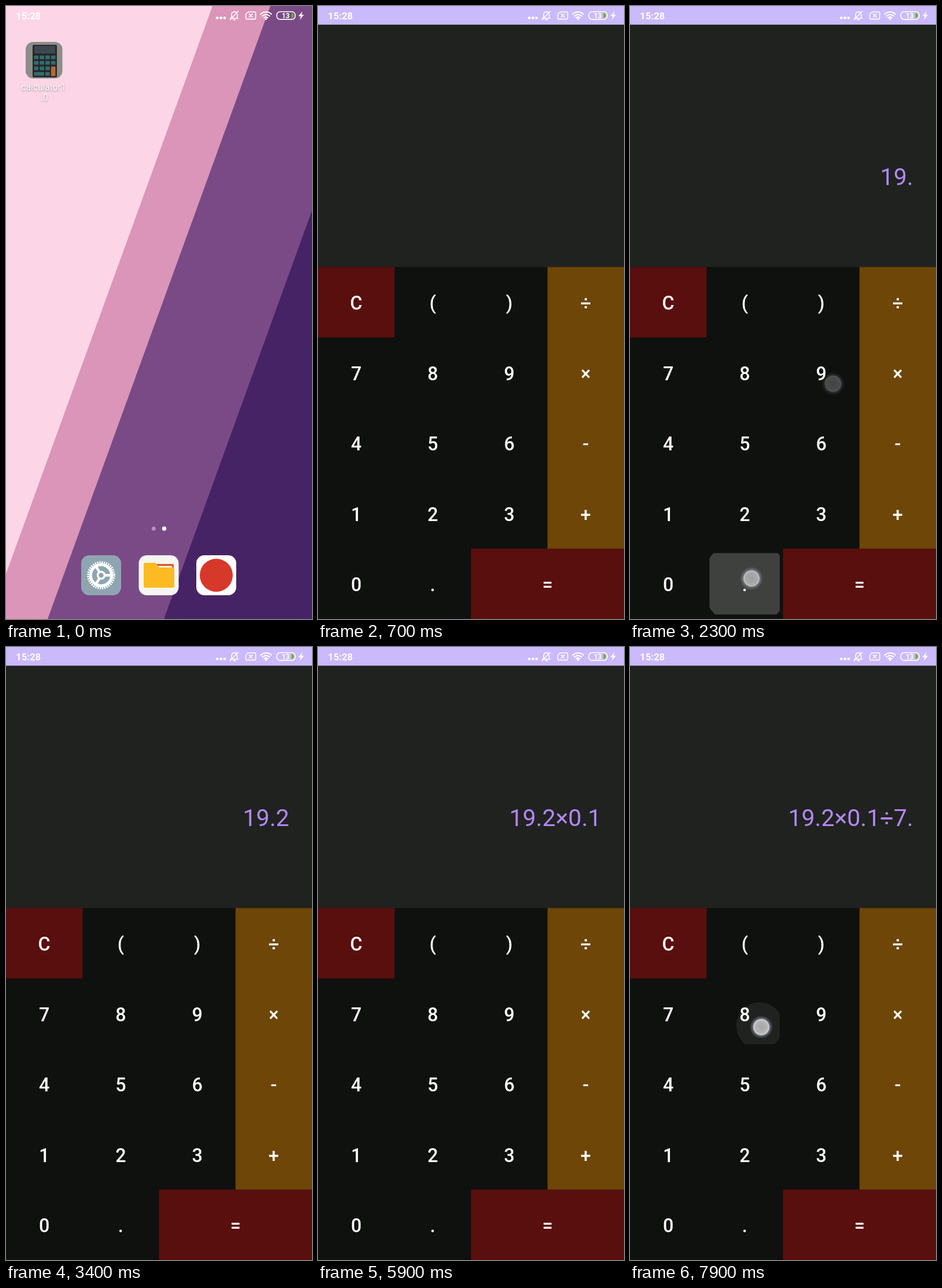
Write an HTML page that moves like this. It is 529 by 1058 pixels and loops after 8000 ms.

```html
<!DOCTYPE html>
<html lang="en">
<head>
<meta charset="utf-8">
<title>Calculator</title>
<style>
  html, body { margin: 0; width: 100%; height: 100%; overflow: hidden; background: #1a1b1e; }
  svg { display: block; width: 100vw; height: 100vh; }
  text { font-family: Roboto, sans-serif; fill: #fff; }
  .key { font-size: 32.3px; font-weight: 500; text-anchor: middle; }
  .label { font-size: 15.6px; text-anchor: middle; filter: drop-shadow(0 1px 1px #0006); }
  .line { fill: none; stroke: #fff; stroke-width: 1.6; stroke-linecap: round; stroke-linejoin: round; }
  #display { font-size: 41px; text-anchor: end; fill: #b388fc; }
</style>
</head>
<body>
<svg viewBox="0 0 529 1058">
  <defs>
    <radialGradient id="touch">
      <stop offset="0" stop-color="#fff" stop-opacity=".6"/>
      <stop offset=".5" stop-color="#fff" stop-opacity=".66"/>
      <stop offset=".67" stop-color="#fff" stop-opacity=".78"/>
      <stop offset=".74" stop-color="#c4c4ea" stop-opacity=".4"/>
      <stop offset="1" stop-color="#c4c4ea" stop-opacity="0"/>
    </radialGradient>
  </defs>

  <g id="home">
    <path fill="#fcd6e6" d="M0 0H529V1058H0Z"/>
    <path fill="#da95b8" d="M357 0H529V1058H0V980Z"/>
    <path fill="#7a4a86" d="M457 0H529V1058H72Z"/>
    <path fill="#462365" d="M529 353V1058H273Z"/>
    <rect x="34" y="62" width="63.5" height="63" rx="13" fill="#8c8d88"/>
    <rect x="46" y="67" width="42" height="56" rx="2" fill="#292627"/>
    <rect x="49" y="69" width="36" height="13" fill="#3d4852"/>
    <g id="miniKeys" fill="#2f6e70"></g>
    <text class="label" x="65" y="146">calculator1</text>
    <text class="label" x="66" y="164">.0</text>
    <circle cx="255.3" cy="902" r="3.6" fill="#fff" opacity=".4"/>
    <circle cx="273.5" cy="902" r="3.7" fill="#fff"/>

    <rect x="130" y="948" width="69" height="69" rx="14" fill="#8ea5b1"/>
    <g transform="translate(164.5 982.5)" fill="none" stroke="#fff">
      <circle r="22.3" stroke-width="4" stroke-dasharray="2.2 1.692"/>
      <circle r="18.2" stroke-width="5"/>
      <circle r="6" stroke-width="3.5"/>
      <path id="spokes" stroke-width="4.5"/>
    </g>

    <rect x="229.5" y="948" width="69" height="69" rx="14" fill="#f5f5f3"/>
    <path fill="#e0582c" d="M256 963H288a2 2 0 0 1 2 2V975H256Z"/>
    <path fill="#fff" d="M261 966.5H287V975H261Z"/>
    <path fill="#fdba22" d="M241 961H258L265 969H288a3 3 0 0 1 3 3V1001a3 3 0 0 1-3 3H241a3 3 0 0 1-3-3V964a3 3 0 0 1 3-3Z"/>

    <rect x="329" y="948" width="69" height="69" rx="14" fill="#fff"/>
    <circle cx="363.5" cy="982.5" r="28.5" fill="#d6382a"/>
  </g>

  <rect id="splash" fill="#1a1b1e"/>

  <g id="calc">
    <path fill="#20221f" d="M0 0H529V451H0Z"/>
    <path fill="#cab9fb" d="M0 0H529V32.3H0Z"/>
    <path fill="#0f110f" d="M0 450.5H529V1058H0Z"/>
    <path fill="#5a0f0f" d="M0 450.5H132.2V572H0ZM264.5 936.5H529V1058H264.5Z"/>
    <path fill="#6e4607" d="M396.8 450.5H529V936.5H396.8Z"/>
    <g id="ripples" fill="#fff"></g>
    <g id="keys"></g>
    <text id="display" x="489.5" y="309.3"></text>
    <g id="touches" fill="url(#touch)"></g>
  </g>

  <g id="status">
    <text x="17" y="22.6" font-size="16.8" font-weight="700">15:28</text>
    <g fill="#fff">
      <circle cx="365.2" cy="20.6" r="2.4"/><circle cx="371.5" cy="20.6" r="2.4"/><circle cx="377.8" cy="20.6" r="2.4"/>
      <path d="M512.5 9L505.5 17.6H509.6L508 24L515 15H510.8Z"/>
      <path fill="#62b51c" d="M493.5 11.7a4.6 4.6 0 0 1 4 4.6a4.6 4.6 0 0 1-4 4.6Z"/>
    </g>
    <g class="line">
      <path d="M388 21.2H401.5M390 20V15a5 5 0 0 1 9-3M399.7 14V20.5M393 23.6H396.5M387.5 23.8L401.5 9"/>
      <path d="M418.5 10.2H430a1.6 1.6 0 0 1 1.6 1.6V21a1.6 1.6 0 0 1-1.6 1.6H416.2a1.6 1.6 0 0 1-1.6-1.6V14ZM420.2 13.6L425.8 19.2M425.8 13.6L420.2 19.2"/>
      <path stroke-width="2.2" d="M440.3 14a13.2 13.2 0 0 1 18.4 0M443.3 17.3a9 9 0 0 1 12.4 0M446.4 20.4a4.6 4.6 0 0 1 6.2 0"/>
      <rect x="468" y="9.7" width="32" height="13.4" rx="6"/>
    </g>
    <circle cx="449.5" cy="22.5" r="1.7" fill="#fff"/>
    <text x="483.6" y="20.7" font-size="12" font-weight="700" text-anchor="middle">13</text>
  </g>
</svg>
<script>
const LOOP = 8000, STEP = 100;
const KEY_W = 132.25, KEY_H = 121.5, TOP = 450.5;
const ROWS = ["C()÷", "789×", "456-", "123+", "0.="];

// key, press time, release time, touch x, touch y
const TAPS = [
  ["1", 1560, 1670, 88, 890],
  ["9", 1925, 2075, 351, 652],
  [".", 2130, 2240, 210, 988],
  ["2", 2820, 2930, 215, 893],
  ["×", 3860, 3980, 482, 652],
  ["0", 4850, 4960, 93, 988],
  [".", 5130, 5240, 210, 988],
  ["1", 5400, 5520, 90, 892],
  ["÷", 6050, 6170, 474, 530],
  ["7", 6950, 7060, 88, 655],
  [".", 7260, 7370, 210, 988],
  ["8", 7857, 8000, 227, 656]
];
const ENTER = 225, EXIT = 150, TOUCH_FADE = 350;

const $ = id => document.getElementById(id);
const clamp = v => Math.max(0, Math.min(1, v));
const mix = (a, b, p) => a + (b - a) * p;
const smooth = p => p * p * (3 - 2 * p);

function set(el, attrs) {
  for (const name in attrs) el.setAttribute(name, attrs[name]);
  return el;
}
function add(parent, tag, attrs) {
  return parent.appendChild(set(document.createElementNS("http://www.w3.org/2000/svg", tag), attrs));
}

const centers = {};
ROWS.forEach((row, r) => [...row].forEach((key, c) => {
  const x = key === "=" ? KEY_W * 3 : KEY_W * (c + 0.5);
  const y = TOP + KEY_H * (r + 0.5);
  centers[key] = [x, y];
  add($("keys"), "text", { class: "key", x, y: y + 13.2 }).textContent = key;
}));

for (let r = 0; r < 4; r++)
  for (let c = 0; c < 4; c++) {
    if (c === 3 && r > 1 || r === 3 && c === 1) continue;
    const wide = r === 3 && c === 0;
    add($("miniKeys"), "rect", { x: 48.5 + c * 9.8, y: 85.5 + r * 9.5, width: wide ? 17.5 : 7.6, height: 6.2, rx: 1 });
  }
add($("miniKeys"), "rect", { x: 78, y: 104.5, width: 7.5, height: 16.5, rx: 1, fill: "#b86a2c" });

$("spokes").setAttribute("d", [0, 120, 240].map(deg => {
  const a = deg * Math.PI / 180, x = Math.cos(a), y = Math.sin(a);
  return `M${x * 7} ${y * 7}L${x * 17} ${y * 17}`;
}).join(""));

const taps = TAPS.map(([key, down, up, x, y], i) => {
  const [cx, cy] = centers[key];
  const tap = { key, down, up, x, y, cx, cy };
  tap.touch = add($("touches"), "circle", { cx: x, cy: y, r: 20 });
  if (!"÷×".includes(key)) {
    const clip = add(document.querySelector("defs"), "clipPath", { id: "clip" + i });
    add(clip, "rect", { x: cx - 61, y: cy - 53, width: 121.6, height: 106, rx: 3 });
    tap.ripple = add($("ripples"), "circle", { "clip-path": `url(#clip${i})` });
  }
  return tap;
});

function drawTap(tap, t) {
  const age = t - tap.down;
  set(tap.touch, { opacity: age < 0 ? 0 : clamp(1 - (t - tap.up) / TOUCH_FADE) });
  if (!tap.ripple) return;
  const p = smooth(clamp(age / ENTER));
  const release = Math.max(tap.up, tap.down + ENTER);
  set(tap.ripple, {
    cx: mix(tap.x, tap.cx, p),
    cy: mix(tap.y, tap.cy, p),
    r: mix(36, 83, p),
    opacity: 0.2 * clamp(age / 120) * clamp(1 - (t - release) / EXIT)
  });
}

function drawLaunch(t) {
  const p = 1 - (1 - clamp((t - 60) / 400)) ** 3;
  set($("splash"), {
    x: mix(34, 0, p), y: mix(62, 0, p),
    width: mix(63.5, 529, p), height: mix(63, 1058, p),
    rx: p < 1 ? mix(13, 26, p) : 0,
    opacity: clamp((t - 60) / 90)
  });
  set($("calc"), { opacity: clamp((t - 540) / 110) });
}

function frame(now) {
  const t = Math.floor(now % LOOP / STEP) * STEP;
  drawLaunch(t);
  taps.forEach(tap => drawTap(tap, t));
  $("display").textContent = taps.filter(tap => t >= tap.up).map(tap => tap.key).join("");
}

const start = performance.now();
function tick() {
  frame(performance.now() - start);
  requestAnimationFrame(tick);
}
tick();
</script>
</body>
</html>
```
